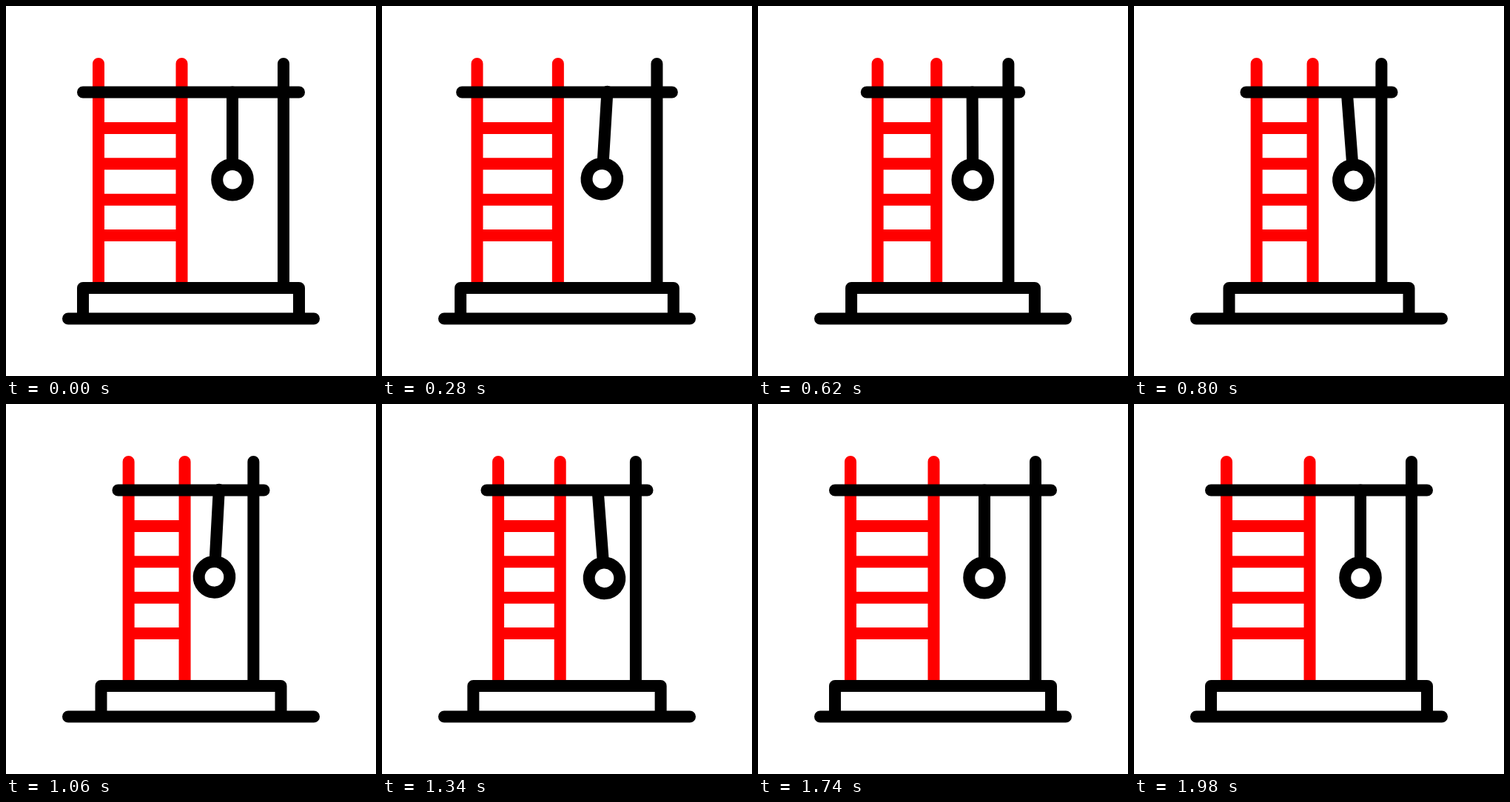
Recreate the animation shown at these times as an HTML page. Size 500 by 500 pixels, loop 2000 ms.

```html
<!DOCTYPE html>
<html>
<head>
<meta charset="utf-8">
<style>
html, body { margin: 0; width: 100%; height: 100%; overflow: hidden; background: #fff; }
svg { display: block; width: 100vw; height: 100vh; }
path, circle { fill: none; stroke: #000; stroke-width: 16; stroke-linecap: round; stroke-linejoin: round; }
#ladder { stroke: #f00; }
</style>
</head>
<body>
<svg viewBox="0 0 500 500">
  <path id="ladder"/>
  <path id="frame"/>
  <path id="base"/>
  <g id="swing">
    <path d="M306 116.5V210"/>
    <circle cx="306" cy="234.7" r="20.8"/>
  </g>
</svg>
<script>
const LOOP = 2000, RISE = 182, FALL = 1180, SPAN = 545;
const SWING = [0, 11.5, -6.3, 4.3, -5.1, 0];  // degrees, one step per half span
const RUNGS = [165, 213.3, 261.7, 310];
const el = id => document.getElementById(id);

function ease(u) {
  u = Math.min(1, Math.max(0, u));
  return u * u * (3 - 2 * u);
}

function swingAngle(t) {
  const k = (t - RISE) / (SPAN / 2), i = Math.floor(k);
  if (i < 0 || i >= SWING.length - 1) return 0;
  return SWING[i] + (SWING[i + 1] - SWING[i]) * ease(k - i);
}

function draw(t) {
  const squeeze = ease((t - RISE) / SPAN) - ease((t - FALL) / SPAN);
  const s = 1 - 0.325 * squeeze;
  const x = d => 250 + d * s;
  const leg = 146 - 24.5 * squeeze;
  const post = d => `M${x(d)} 78V381`;

  el('ladder').setAttribute('d', post(-125) + post(-12.5) +
    RUNGS.map(y => `M${x(-125)} ${y}H${x(-12.5)}`).join(''));
  el('frame').setAttribute('d', post(125) + `M${x(-146)} 116.5H${x(146)}`);
  el('base').setAttribute('d',
    `M84 422.5H416M${250 - leg} 422.5V381H${250 + leg}V422.5`);
  // The swing pivots slightly right of its rope.
  el('swing').setAttribute('transform',
    `translate(${x(56) - 306}) rotate(${swingAngle(t)} 319 116.5)`);
}

const start = performance.now();
function tick() {
  draw((performance.now() - start) % LOOP);
  requestAnimationFrame(tick);
}
tick();
</script>
</body>
</html>
```
